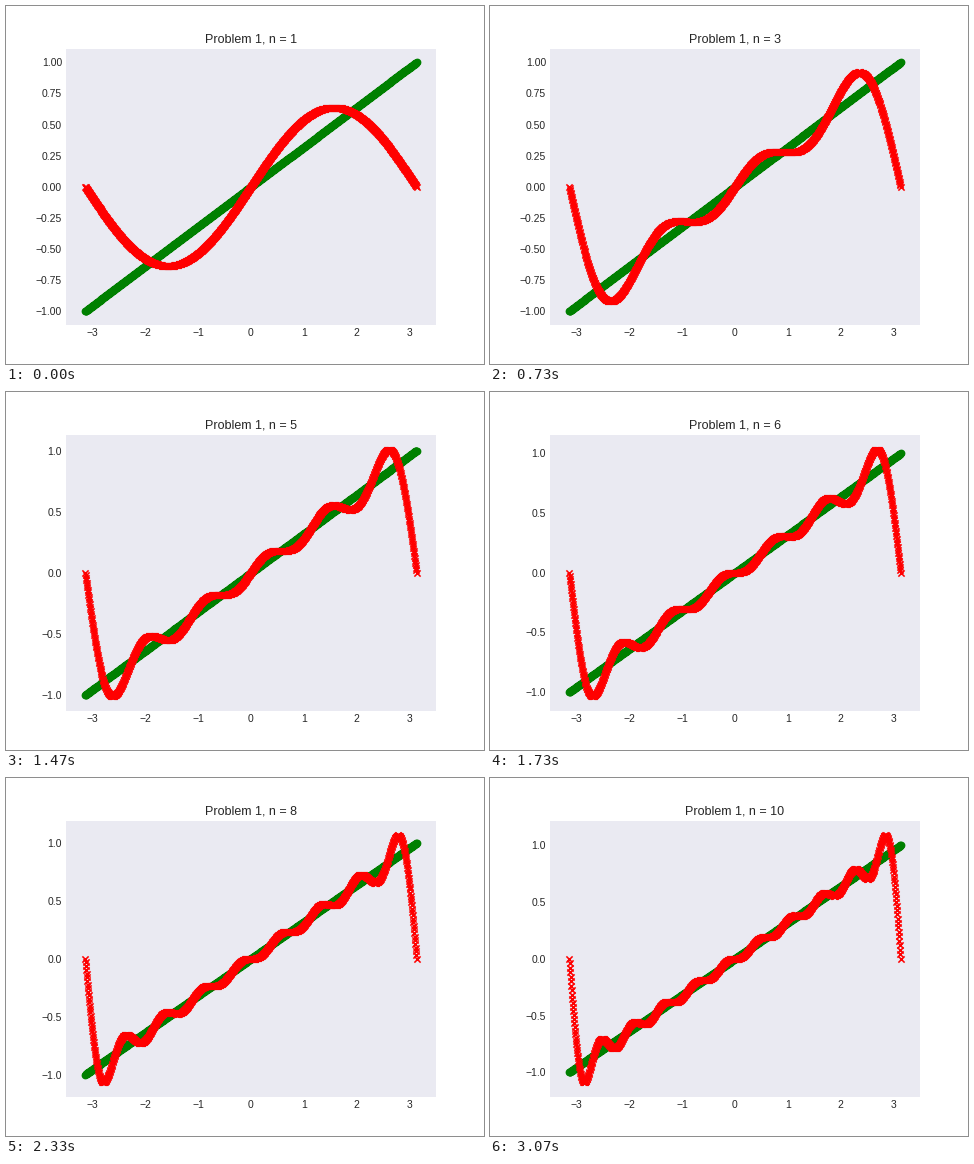
Write a matplotlib script that moves like this. It is 478 px wide and 358 px high and loops after 3.34 s.

```python
import numpy as np
import matplotlib.pyplot as plt
from matplotlib.animation import FuncAnimation
from matplotlib.ticker import MultipleLocator

W, H, DPI = 478, 358, 74.7
TERMS = 10
FRAMES, INTERVAL = 167, 20   # one loop of 3340 ms
INK = "0.15"

plt.rcParams["font.family"] = "Liberation Sans"

x = np.linspace(-np.pi, np.pi, 1000)
line = x / np.pi


def partial_sum(n):
    """Fourier sine series of x / pi, cut after n terms."""
    k = np.arange(1, n + 1)[:, None]
    return (2 / np.pi * (-1.0) ** (k + 1) / k * np.sin(k * x)).sum(axis=0)


fig = plt.figure(figsize=((W + 0.001) / DPI, (H + 0.001) / DPI), dpi=DPI,
                 facecolor="white")
ax = fig.add_axes([0.125, 0.11, 0.775, 0.77], facecolor="#EAEAF2")
for spine in ax.spines.values():
    spine.set_visible(False)
ax.tick_params(length=0, pad=3.5, labelsize=10, labelcolor=INK)
ax.set_xlim(-3.511, 3.511)
ax.xaxis.set_major_locator(MultipleLocator(1))

ax.scatter(x, line, s=36, c="green", marker="o", linewidths=1.5)
series = ax.scatter(x, line, s=36, c="red", marker="x", linewidths=1.5)
title = ax.set_title("", fontsize=12, color=INK, pad=6)


def update(i):
    # three terms are added per second (50 frames)
    n = min(1 + (3 * i + 2) // 50, TERMS)
    y = partial_sum(n)
    series.set_offsets(np.column_stack([x, y]))
    top = 1.1 * max(1.0063, y.max() + 0.017)
    ax.set_ylim(-top, top)
    ax.yaxis.set_major_locator(MultipleLocator(0.25 if n < 5 else 0.5))
    title.set_text(f"Problem 1, n = {n}")
    return series, title


anim = FuncAnimation(fig, update, frames=FRAMES, init_func=lambda: update(0),
                     interval=INTERVAL, repeat=True, repeat_delay=0)
plt.show()
```
